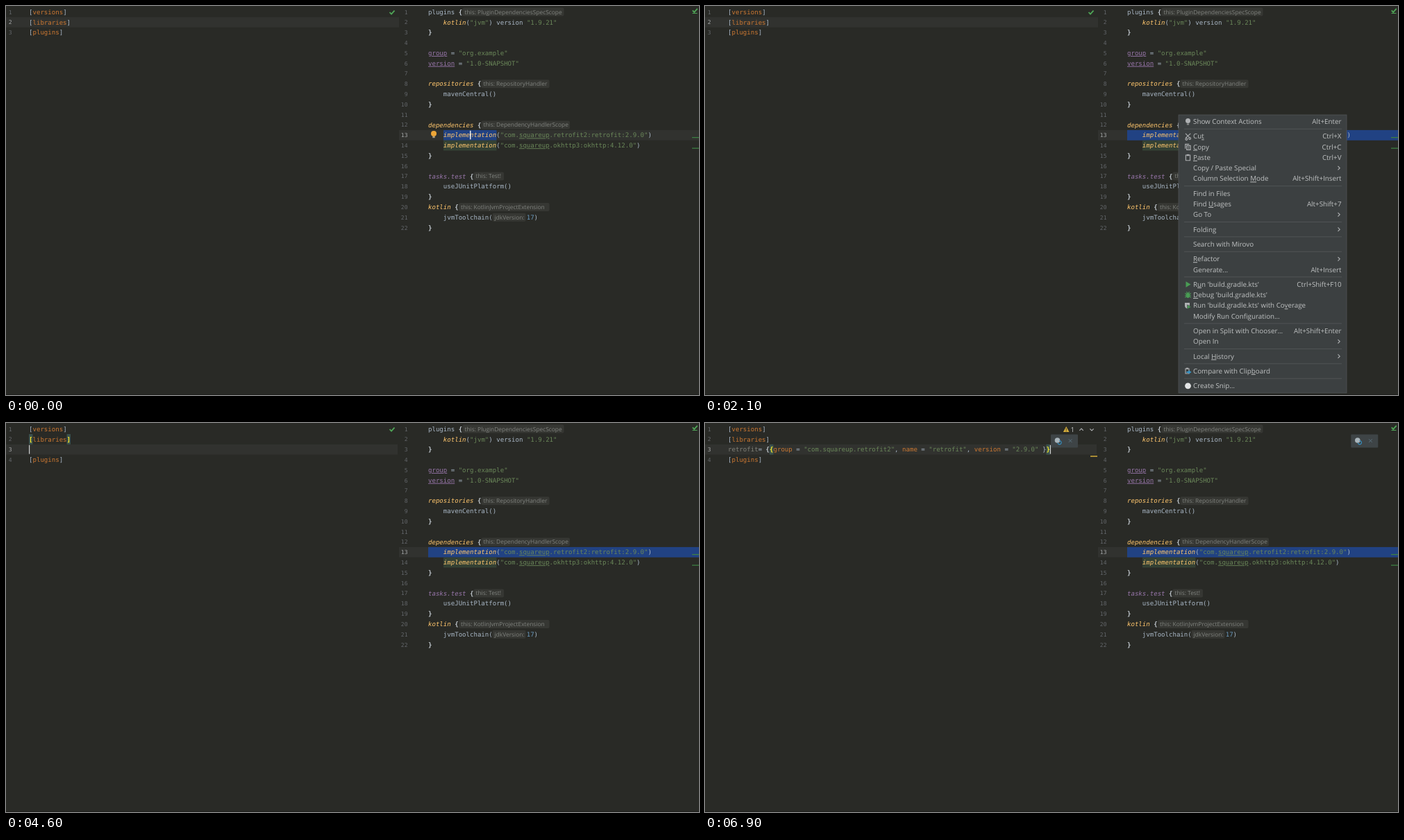
These frames come from a looping animation (998 px wide and 561 px high, 7000 ms). An HTML page:

```html
<!DOCTYPE html>
<html lang="en">
<head>
<meta charset="utf-8">
<title>Version catalog paste</title>
<style>
html, body { margin: 0; width: 100%; height: 100%; overflow: hidden; background: #292a26; }
svg { display: block; width: 100%; height: 100%; }
text { text-rendering: geometricPrecision; fill: #a9b7c6; }
.code { font: 9.07px "DejaVu Sans Mono", monospace; }
.num { font: 8px "DejaVu Sans Mono", monospace; fill: #63666a; text-anchor: end; }
.num.now { fill: #a4a6a6; }
.hint { font: 8.4px "Open Sans", sans-serif; fill: #80837f; }
.ui { font: 9.8px "Open Sans", sans-serif; fill: #bfc1c2; }
.small { font-size: 8.8px; }
.end { text-anchor: end; }
.k { fill: #cc7832; }
.s { fill: #6a8759; }
.w { fill: #6a8759; text-decoration: underline; }
.f { fill: #ffc66d; font-style: italic; }
.y { fill: #ffc66d; }
.p { fill: #9876aa; text-decoration: underline; }
.q { fill: #9876aa; font-style: italic; }
.n { fill: #6897bb; }
.b { fill: #c3cad0; font-weight: bold; }
.m { fill: #ffef28; font-weight: bold; }
.l { fill: #589df6; }
.g { fill: #808078; }
.u { text-decoration: underline; }
.line { fill: none; stroke: #afb1b3; stroke-width: 1.1; }
.beam { animation: drift 7s linear infinite; }
@keyframes drift {
  0%, 25.7% { transform: translateX(0); }
  28.6%, 100% { transform: translateX(16.5px); }
}
</style>
</head>
<body>
<svg id="stage" viewBox="0 0 998 561"></svg>
<script>
const LOOP = 7000, CH = 5.457, PITCH = 14.81;
const LX = 33, RX = 608;
const ROW = '#31322f', SELECT = '#214283';
let rules = '', count = 0;

const mid = row => 8.6 + (row - 1) * PITCH;
const col = (x, n) => x + n * CH;
const rect = (x, y, w, h, fill, more = '') =>
  `<rect x="${x}" y="${y}" width="${w}" height="${h}" fill="${fill}" ${more}/>`;
const path = (d, style = '') => `<path class="line" d="${d}" style="${style}"/>`;
const dot = (x, y, r, fill) => `<circle cx="${x}" cy="${y}" r="${r}" fill="${fill}"/>`;
const band = (row, x, w, fill) => rect(x, mid(row) - 7.4, w, PITCH, fill);

// `c text` between backticks puts text in class c
const mark = s => s.split('`').map((part, i) =>
  i % 2 ? `<tspan class="${part[0]}">${part.slice(2)}</tspan>` : part).join('');
const text = (cls, x, y, s) => `<text class="${cls}" x="${x}" y="${y}">${mark(s)}</text>`;
const code = (x, row, s) => text('code', x, mid(row) + 3.1, s);
const num = (x, row, now) => text('num' + (now ? ' now' : ''), x, mid(row) + 2.9, String(row));
const hint = (x, row, w, s) =>
  rect(x, mid(row) - 6, w, 12, '#363733', 'rx="2"') + text('hint', x + 3, mid(row) + 2.9, s);

// Shows content only during the given [from, to) spans
function on(spans, ...content) {
  const name = 'on' + count++;
  const at = t => Math.max(0, (t - 5) / LOOP * 100) + '%';
  const steps = spans.map(([a, b]) =>
    `${at(a)}{opacity:1}` + (b < LOOP ? `${at(b)}{opacity:0}` : '100%{opacity:1}')).join('');
  rules += `@keyframes ${name}{0%{opacity:0}${steps}}` +
    `.${name}{opacity:0;animation:${name} ${LOOP}ms step-end infinite}`;
  return `<g class="${name}">${content.join('')}</g>`;
}

const icons = {
  bulb: dot(0, -1, 3.5, '#afb1b3') + rect(-1.6, 2.9, 3.2, 2, '#8b8d8e'),
  cut: path('M-3.5-4L2.2 2M-3.5 2.5L3.8-4') + path('M-2.2 2.6a1.4 1.4 0 1 0 .1 0M2.6 1.6a1.4 1.4 0 1 0 .1 0'),
  copy: path('M-1.8-1.8h5.4v6h-5.4zM-3.8 2.5v-6.3h5.5') + path('M-.3.2h2.4M-.3 2.1h2.4', 'stroke-width:.8'),
  paste: path('M-3.1-3.4h6.2v7.7h-6.2z') + rect(-1.7, -4.6, 3.4, 2.4, '#afb1b3'),
  run: '<path d="M-3-4.2L4 0L-3 4.2z" fill="#499c54"/>',
  bug: '<ellipse cy=".6" rx="2.7" ry="3.7" fill="#499c54"/>' +
    path('M-4.2-2.6l8.4 6.2M4.2-2.6l-8.4 6.2M-4.3.6h8.6M-2-4.6l1 2M2-4.6l-1 2', 'stroke:#499c54'),
  cover: '<path d="M-4.5-4h7v4q0 3-3.5 4.6q-3.500-1.600-3.500-4.600z" fill="#afb1b3"/>' +
    '<path d="M-.8-.9L4.800 2L-.8 5z" fill="#499c54" stroke="#3c4041" stroke-width=".7"/>',
  compare: path('M-3.500-3.500h5v7h-5z') + rect(-2.5, -4.800, 3, 2, '#afb1b3') +
    '<path d="M-2 .5h3v-2l4 3-4 3v-2h-3z" fill="#3592c4"/>',
  disc: dot(0, 0, 4.4, '#e3e5e6')
};

// Items are [label, shortcut or '>', icon, highlight spans]; null is a separator
function menu(x, y, h, items) {
  let out = rect(x, y, 242, h, '#3c4041', 'stroke="#505355" stroke-width=".8"');
  let cy = y + 9.6;
  for (const item of items) {
    if (!item) {
      out += rect(x + 8, cy - 5, 227, .9, '#535658');
      cy += 6.1;
      continue;
    }
    const [label, key, icon, hot] = item;
    if (hot) out += on(hot, rect(x, cy - 7.6, 242, 15.2, '#2f62c6'));
    if (icon) out += `<g transform="translate(${x + 13.5} ${cy})">${icons[icon]}</g>`;
    out += text('ui', x + 21, cy + 3.4, label);
    if (key === '>') out += path(`M${x + 229.5} ${cy - 2.700}l2.700 2.700-2.700 2.700`);
    else if (key) out += text('ui end', x + 234.5, cy + 3.4, key);
    cy += 15.25;
  }
  return out;
}

const show = ['Show Context Actions', 'Alt+Enter', 'bulb'];
const special = ['Copy / Paste Special', '>'];
const column = ['Column Selection `u M`ode', 'Alt+Shift+Insert'];
const generate = ['Generate...', 'Alt+Insert'];
const tail = [
  ['Open in Split with Chooser...', 'Alt+Shift+Enter'], ['Open In', '>'], null,
  ['Local `u H`istory', '>'], null,
  ['Compare with Clip`u b`oard', '', 'compare'], null,
  ['Create Snip…', '', 'disc']
];
const rightMenu = [
  show, null,
  ['Cu`u t`', 'Ctrl+X', 'cut'],
  ['`u C`opy', 'Ctrl+C', 'copy', [[2400, 3000]]],
  ['`u P`aste', 'Ctrl+V', 'paste'],
  special, column, null,
  ['Find in Files'], ['Find `u U`sages', 'Alt+Shift+7'], ['Go To', '>'], null,
  ['Folding', '>'], null,
  ['Search with Mirovo'], null,
  ['`u R`efactor', '>'], generate, null,
  ["R`u u`n 'build.gradle.kts'", 'Ctrl+Shift+F10', 'run'],
  ["`u D`ebug 'build.gradle.kts'", '', 'bug'],
  ["Run 'build.gradle.kts' with Co`u v`erage", '', 'cover'],
  ['Modify Run Configuration…'], null,
  ...tail
];
const leftMenu = [
  show, null,
  ['`u P`aste', 'Ctrl+V', 'paste', [[5500, 6200]]],
  special, column, null,
  ['Go To', '>'], null,
  ['Folding', '>'], ['Analy`u z`e', '>'], null,
  ['`u R`efactor', '>'], generate, null,
  ...tail
];

const check = (x, y) => path(`M${x} ${y}l2.500 2.600 4.500-5`, 'stroke:#4fa557;stroke-width:1.8');
const caret = (x, row) => rect(x, mid(row) - 6.4, 1.2, 12.8, '#d0d2d2');
const brace = (x, row, s) => band(row, x, CH, '#3b514d') + code(x, row, '`m ' + s + '`');
const sync = x => rect(x, 16.5, 39, 19, '#3e4446', 'rx="1"') + dot(x + 9.500, 25, 3.800, '#a9b5bb') +
  path(`M${x + 10} 28.500a2.600 2.600 0 1 0 2.200-2.800`, 'stroke:#3592c4') +
  path(`M${x + 25.800} 23.300l4.600 4.600m0-4.600l-4.600 4.600`, 'stroke:#5d7480;stroke-width:.9');

function leftPane() {
  const before = [[0, 4600]], after = [[4600, LOOP]];
  const matched = [[3500, 5100]], pasted = [[6200, LOOP]], warned = [[6700, LOOP]];
  const entry = ' = `b {` `k group` = `s "com.squareup.retrofit2"`, `k name` = `s "retrofit"`, ' +
    '`k version` = `s "2.9.0"` }';
  const endX = col(LX, 84);
  return [
    on(before, band(2, 0, 566, ROW), num(8.5, 2, true), num(8.5, 3), code(LX, 3, '[`k plugins`]')),
    on(after, band(3, 0, 564, ROW), num(8.5, 2), num(8.5, 3, true), num(8.5, 4), code(LX, 4, '[`k plugins`]')),
    num(8.5, 1), code(LX, 1, '[`k versions`]'), code(LX, 2, '[`k libraries`]'),
    on(matched, brace(LX, 2, '['), brace(col(LX, 10), 2, ']')),
    on([[3500, 4600]], caret(col(LX, 11) - .5, 2)),
    on([[4600, 5100]], caret(LX, 3)),
    on([[0, 6700]], check(552.5, 9)),
    on(pasted,
      code(col(LX, 8), 3, entry),
      brace(col(LX, 11), 3, '{'), brace(endX, 3, '}'), caret(endX + CH, 3)),
    on([[6200, 6700]], code(LX, 3, '`k retrofit`')),
    on(warned,
      code(LX, 3, '`g retrofit`'),
      '<path d="M520.200 5l4.300 8h-8.600z" fill="#d6ae3c"/>', rect(519.700, 7.500, 1, 3, '#3a3520'),
      rect(519.700, 11.200, 1, 1, '#3a3520'),
      text('ui', 526.5, 12.6, '1'),
      path('M539.300 10.800l2.700-2.700 2.700 2.700M554.300 8.300l2.700 2.700 2.700-2.700'),
      rect(555, 47.200, 10, 1.600, '#c9a53a')),
    on([[6500, LOOP]], sync(498))
  ].join('');
}

function rightPane() {
  const dep = (row, lib) => code(col(RX, 4), row, '`f implementation`(`s "com.``w squareup``s .' + lib + '"`)');
  const lines = {
    1: 'plugins `b {`', 3: '`b }`',
    5: '`p group` = `s "org.example"`', 6: '`p version` = `s "1.0-SNAPSHOT"`',
    8: '`f repositories` `b {`', 10: '`b }`',
    12: '`f dependencies` `b {`', 15: '`b }`',
    17: '`q tasks.test` `b {`', 19: '`b }`',
    20: '`f kotlin` `b {`', 22: '`b }`'
  };
  const inner = {
    2: '`f kotlin`(`s "jvm"`) version `s "1.9.21"`',
    9: 'mavenCentral()', 18: 'useJUnitPlatform()', 21: 'jvmToolchain('
  };
  let out = band(13, 566, 432, ROW) +
    on([[0, 200]], band(13, 630, 76.500, SELECT)) +
    on([[200, LOOP]], band(13, RX, 390, SELECT)) +
    band(14, 630, 76.500, '#344134');
  for (let row = 1; row <= 22; row++) out += num(578.5, row, row === 13);
  for (const row in lines) out += code(RX, row, lines[row]);
  for (const row in inner) out += code(col(RX, 4), row, inner[row]);
  out += dep(13, 'retrofit2:retrofit:2.9.0') + dep(14, 'okhttp3:okhttp:4.12.0') +
    hint(657.5, 1, 146, 'this: PluginDependenciesSpecScope') +
    hint(684.5, 8, 98, 'this: RepositoryHandler') +
    hint(684.5, 12, 127.5, 'this: DependencyHandlerScope') +
    hint(673.5, 17, 43.5, 'this: Test!') +
    hint(652, 20, 130.5, 'this: KotlinJvmProjectExtension') +
    hint(700.5, 21, 48, 'jdkVersion:') +
    code(749.700, 21, '`n 17`)') +
    check(988.700, 6.300) + rect(988.500, 10, 7, 1, '#4fa557') +
    rect(988, 189, 10, 1.3, '#3c7f42') + rect(988, 204.500, 10, 1.3, '#3c7f42');
  out += on([[0, 2100]], dot(616, 184, 4, '#eda638'), rect(614.300, 188, 3.400, 2.200, '#a9a08a'));
  out += on([[0, 2100], [3000, 3100]], `<g class="beam">${rect(668, 179.800, 1.5, 12.600, '#e8eaea')}</g>`);
  return out + on([[6500, LOOP]], sync(930.3));
}

function docPopup() {
  return rect(685, 196, 253, 82, '#45484a', 'stroke="#5d6062" stroke-width=".8"') +
    text('code', 689.3, 209.600, '`k public fun` DependencyHandler.`y implementation`(') +
    text('code', 711.2, 221.600, 'dependencyNotation: Any') +
    text('code', 689.3, 233.600, '): Dependency?') +
    text('code', 691.5, 247.100, '`l org.gradle.kotlin.dsl`') +
    text('ui small', 692, 258.600, 'ImplementationConfigurationAccessorsKt.class') +
    '<path d="M690.500 265h3.500l1 1.300h4.500v6h-9z" fill="#9da3a6"/>' +
    rect(695.500, 268, 5, 4.800, '#6f8f7b') +
    [266.500, 269.800, 273.100].map(y => dot(930, y, 1, '#d0d2d3')).join('');
}

document.getElementById('stage').innerHTML =
  rect(0, 0, 998, 561, '#292a26') + rect(0, 560, 998, 1, '#1d1e1c') +
  leftPane() + rightPane() +
  on([[1500, 2100]], docPopup()) +
  on([[2100, 3000]], menu(682, 157, 401, rightMenu)) +
  on([[5100, 6200]], menu(84, 38.5, 266.5, leftMenu));

const sheet = document.createElement('style');
sheet.textContent = rules;
document.head.append(sheet);
</script>
</body>
</html>
```
